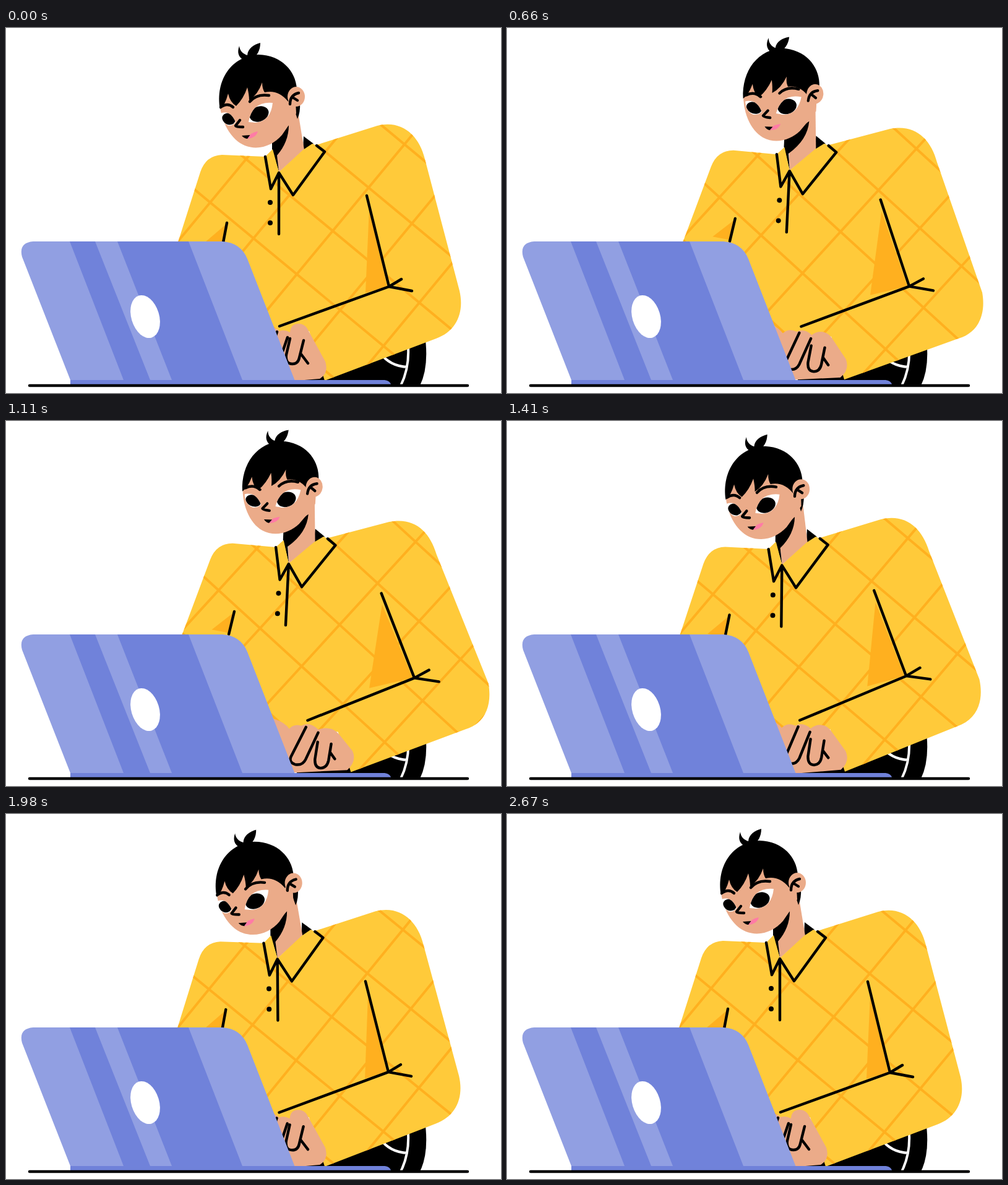
Animation of 800x590 px, one loop 2700 ms. Source, as an HTML page:

```html
<!DOCTYPE html>
<html lang="en">
<head>
<meta charset="utf-8">
<title>Working at a laptop</title>
<style>
/* --u: lean of the body; --a and --b: end poses of a changing outline */
@property --u { syntax: "<number>"; inherits: true; initial-value: 0; }

html, body { margin: 0; width: 100%; height: 100%; overflow: hidden; background: #fff; }
svg { display: block; width: 100%; height: 100%; }

.scene, .lean, .reach, .blink {
  animation: 2700ms cubic-bezier(.37, 0, .63, 1) infinite;
}
.scene { animation-name: lean-amount; }
.lean { animation-name: lean; }
.reach { animation-name: reach; }
.blink { animation-name: blink; }

@keyframes lean-amount {
  0%, 100% { --u: 0; }
  27.04%, 40% { --u: 1; }
  60%, 64.8% { --u: -.17; }
}
@keyframes lean {
  0%, 60%, 100% { d: var(--a); }
  27.04%, 40% { d: var(--b); }
}
@keyframes reach {
  0%, 8.63%, 70%, 100% { d: var(--a); }
  33.4%, 42.6% { d: var(--b); }
}
@keyframes blink {
  0%, 81.1%, 93.7%, 100% { d: var(--a); }
  87%, 87.5% { d: var(--b); }
}

.body {
  transform: translate(calc(490px + var(--u) * 1.2px), calc(530px - var(--u) * .8px))
    rotate(calc(var(--u) * 2.85deg)) translate(-490px, -530px);
}
.head {
  transform: translate(calc(408px + var(--u) * 27px), calc(194px - var(--u) * 11px))
    rotate(calc(var(--u) * 6.5deg)) scaleX(calc(1 - var(--u) * .03)) translate(-408px, -194px);
}
.ear { transform: translateX(calc(var(--u) * -5px)); }
.sideburn { transform: translateX(calc(var(--u) * -11px)); }
.near { transform: translate(calc(var(--u) * 11.5px), calc(var(--u) * -3px)); }
.far {
  transform: translate(calc(360px + var(--u) * 6px), calc(147px - var(--u) * 3px))
    scaleX(calc(1 + var(--u) * .22)) translate(-360px, -147px);
}
.mouth { transform: translate(calc(var(--u) * 6px), calc(var(--u) * -2px)); }

.shirt {
  --a: path("M260 400L278 346L314 233Q323 206 349 205L419 208L431 196L441 233L502 189L600 158C640 148 668 174 677 212L733 425C741 460 728 490 695 502L515 570L490 490L430 505Z");
  --b: path("M260 400L278 346L314 233Q323 206 349 205L419 208L431 196L441 233L502 189L600 158C640 148 666 170 679 207L773 411C781 446 771 476 739 487L558 565L534 501L430 505Z");
}
.pit-shade {
  --a: path("M587 292L616 418L581 428Z");
  --b: path("M595 292L650 408L581 428Z");
}
.arm-line {
  --a: path("M583 271L619 418L442 482M619 418L639 406M619 418L656 425");
  --b: path("M593 274L653 408L484 485M653 408L676 394M653 408L693 412");
}
.hand {
  --a: path("M380 480Q405 474 412 488Q430 478 442 490Q450 487 459 492Q460 478 473 478Q482 478 487 486L516 539Q522 558 507 567L470 570H380Z");
  --b: path("M385 482Q440 480 455 500Q462 491 474 494Q488 486 502 499Q514 494 524 497Q530 499 536 505L559 531Q567 547 552 562L470 570H385Z");
}
.fingers {
  --a: path("M438 491L424 536Q420 545 428 547Q438 548 442 538L455 500M459 502L453 528Q451 543 463 543Q472 543 474 533L481 505M476 526L488 542");
  --b: path("M482 496L460 545Q457 554 467 557Q479 559 484 548L502 504M502 519L499 547Q499 561 509 561Q519 560 521 548L524 521M523 535L531 545");
}
.neck {
  --a: path("M434 176L441 233L482 197L471 130L440 150Z");
  --b: path("M436 172L441 233L482 197L478 130L446 146Z");
}
.neck-shade {
  --a: path("M457 157Q457 184 438 206L441 232L430 196V186Z");
  --b: path("M469 152Q468 182 438 206L441 232L430 195V182Z");
}
.near-lid {
  --a: path("M392 152Q398 118 431 121Q428 150 404 153Z");
  --b: path("M392 152Q424 146 431 121Q428 150 404 153Z");
}
.far-lid {
  --a: path("M347 138Q362 132 371 152Q367 158 360 158Q349 154 347 138Z");
  --b: path("M347 145Q357 152 371 154Q367 158 360 158Q350 155 347 145Z");
}

.yellow { fill: #ffca3a; }
.skin { fill: #ebab89; }
.ink { fill: none; stroke: #000; stroke-width: 4.4; stroke-linecap: round; stroke-linejoin: round; }
.white-line { fill: none; stroke: #fff; stroke-width: 4; }
#weave { stroke: #ffb01f; stroke-width: 4; fill: none; }
</style>
</head>
<body>
<svg class="scene" viewBox="0 0 800 590">
  <defs>
    <clipPath id="shirt-clip"><path class="shirt reach"/></clipPath>
    <clipPath id="near-clip"><path class="near-lid blink"/></clipPath>
    <clipPath id="far-clip"><path class="far-lid blink"/></clipPath>
    <clipPath id="lid-clip"><path d="M44 345H350Q379 347 390 373L468 573V577H104V569L26 370Q20 347 44 345Z"/></clipPath>
  </defs>

  <g class="leg">
    <path d="M470 577V560L676 490Q685 545 669 578Z"/>
    <path class="white-line" d="M604 524Q620 547 649 548M649 505Q654 545 638 578"/>
  </g>

  <g class="body">
    <path class="shirt reach yellow"/>
    <g clip-path="url(#shirt-clip)">
      <path id="weave"/>
      <path class="pit-shade reach" fill="#ffb01f"/>
      <path d="M322 346L356 317L350 350Z" fill="#ffb01f"/>
    </g>
    <path d="M481 175L497 187L480 199Z"/>
    <path class="neck lean skin"/>
    <path class="neck-shade lean"/>
    <path class="yellow" d="M419 208L431 196L441 233L428 260ZM441 233L480 197L495 187L502 190L515 200L464 270Z"/>
    <path class="ink" d="M419 208L428 260L441 234L464 270L515 200L502 190M441 236V333M357 315L350 352"/>
    <circle cx="427" cy="282" r="4"/>
    <circle cx="427" cy="315" r="4"/>
    <path class="arm-line reach ink"/>
    <path class="hand reach skin"/>
    <path class="fingers reach ink"/>
  </g>

  <g class="head">
    <path class="sideburn" d="M466 118L475 120Q476 136 471 147L467 135Z"/>
    <path class="skin" d="M345 115C346 152 364 181 386 190C409 199 432 189 446 173L457 157L469 138L466 80H352Z"/>
    <path d="M377 29C373 40 376 47 384 52H396C406 45 411 36 411 24C400 27 391 33 390 44C384 42 378 38 377 29Z"/>
    <path d="M346 131C338 85 364 45 408 43C446 44 468 70 470 98L456 119Q440 99 418 104Q414 98 414 88Q407 108 393 117Q393 108 390 96Q384 114 372 126Q362 120 359 106Q354 125 346 131Z"/>
    <g class="ear">
      <ellipse class="skin" cx="469" cy="111" rx="14" ry="16"/>
      <path class="ink" d="M459 123Q459 108 473 105M463 112L471 117"/>
    </g>
    <g class="near">
      <g clip-path="url(#near-clip)">
        <rect x="385" y="110" width="55" height="50" fill="#fff"/>
        <ellipse cx="409" cy="139" rx="16" ry="12" transform="rotate(-22 409 139)"/>
      </g>
      <path class="ink" d="M394 119Q405 106 425 109M378 149L371 158Q372 160 383 160"/>
    </g>
    <g class="far">
      <g clip-path="url(#far-clip)">
        <rect x="340" y="128" width="40" height="36" fill="#fff"/>
        <ellipse cx="360" cy="147" rx="11" ry="9" transform="rotate(25 360 147)"/>
      </g>
      <path class="ink" d="M347 128Q358 120 367 128"/>
    </g>
    <g class="mouth">
      <path d="M381 174L395 173L391 179Q385 179 381 174Z"/>
      <path d="M390 179L396 171Q402 168 407 167Q404 178 390 179Z" fill="#ff7ba6"/>
    </g>
  </g>

  <g class="laptop">
    <path d="M104 569H612Q621 570 623 578H104Z" fill="#7082da"/>
    <g clip-path="url(#lid-clip)">
      <path d="M0 340H480V569H0Z" fill="#919fe2"/>
      <path d="M103 345H144L233 569H190ZM180 345H295L382 569H268Z" fill="#7082da"/>
    </g>
    <ellipse cx="225" cy="466.5" rx="22.5" ry="35.5" fill="#fff" transform="rotate(-17 225 466.5)"/>
  </g>
  <path class="ink" d="M38 578H746"/>
</svg>
<script>
// Quilted weave: two families of parallel lines through one crossing point.
const line = (x, y, dx, dy) => `M${x - dx} ${y - dy}L${x + dx} ${y + dy}`;
let weave = "";
for (let i = -4; i <= 4; i++) {
  weave += line(470 + 70 * i, 398 + 58 * i, 464, -560);
  weave += line(470 + 58 * i, 398 - 70 * i, 560, 464);
}
document.getElementById("weave").setAttribute("d", weave);
</script>
</body>
</html>
```
